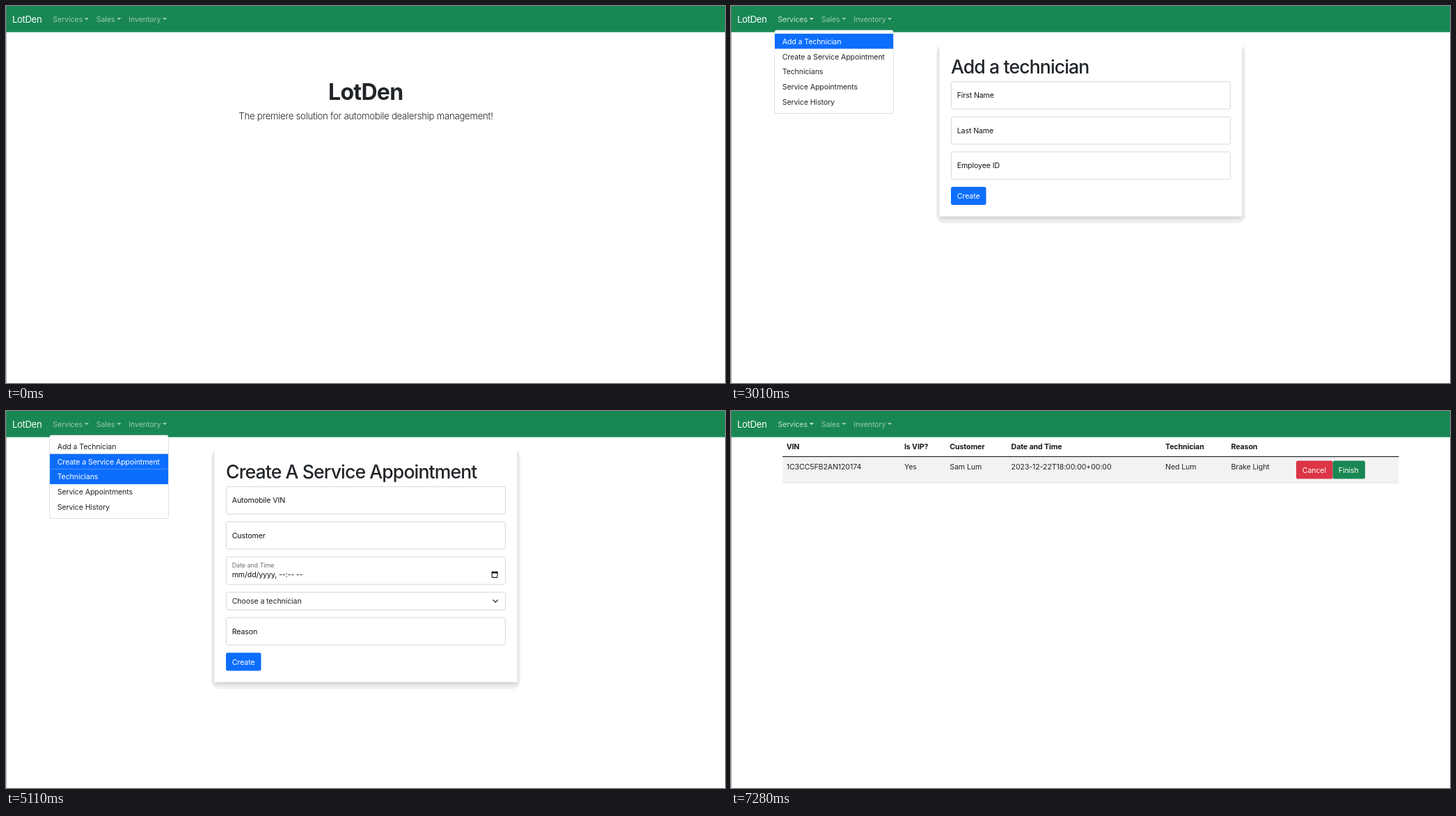
These frames come from a looping animation (1033x542 px, 8 s). An HTML page:

```html
<!DOCTYPE html>
<html lang="en">
<head>
<meta charset="utf-8">
<title>Dealership management</title>
<style>
  html, body { margin: 0; width: 100%; height: 100%; overflow: hidden; background: #fff; }
  svg { display: block; width: 100vw; height: 100vh; }
  text { font: 400 10.6px Inter, "Noto Sans", sans-serif; letter-spacing: -.01em; font-optical-sizing: none; white-space: pre; }
  .brand { font-size: 13.2px; letter-spacing: -.03em; }
  .hero { font-size: 32px; font-weight: 700; letter-spacing: -.022em; }
  .lead { font-size: 13.2px; font-weight: 300; letter-spacing: -.02em; }
  .title { font-size: 26.6px; font-weight: 500; letter-spacing: -.033em; }
  .small { font-size: 9px; }
  .head { font-weight: 700; }
  .mid { text-anchor: middle; }
  .card { filter: drop-shadow(0 3px 2.5px rgba(0, 0, 0, .14)); }
</style>
</head>
<body>
<svg id="stage" viewBox="0 0 1033 542" preserveAspectRatio="none"></svg>
<script>
const LOOP = 8000, TICK = 70;
const INK = '#212529', BLUE = '#0d6efd', GREEN = '#198754', RED = '#dc3545';
const BRAND = 'LotDen';
const ITEMS = ['Add a Technician', 'Create a Service Appointment', 'Technicians',
  'Service Appointments', 'Service History'];
const ITEM_H = 21.9;

// Pages by start time; "active" is the menu entry of that page.
const PAGES = [
  { at: 0, draw: home, active: -1 },
  { at: 2310, draw: technicianForm, active: 0 },
  { at: 3780, draw: appointmentForm, active: 1 },
  { at: 5180, draw: technicianList, active: 2 },
  { at: 6650, draw: appointmentList, active: 3 }
];

// Each visit to the menu: open, hover an item, press it, close.
const MENUS = [
  { open: 630, hover: 1540, press: 2240, close: 2310, item: 0 },
  { open: 2870, hover: 3290, press: 3640, close: 3780, item: 1 },
  { open: 4480, hover: 4830, press: 5110, close: 5180, item: 2 },
  { open: 6020, hover: 6300, press: 6580, close: 6650, item: 3 }
];

// Fades of the "Services" link: start, end, target (1 = lit).
const FADES = [
  [210, 350, 1], [980, 1190, 0], [2450, 2660, 1], [3080, 3290, 0], [4200, 4410, 1],
  [4550, 4690, 0], [5600, 5810, 1], [6090, 6300, 0], [7070, 7280, 1]
];

const rect = (x, y, w, h, fill, more = '') =>
  `<rect x="${x}" y="${y}" width="${w}" height="${h}" fill="${fill}" ${more}/>`;
const text = (x, y, str, fill = INK, cls = '') =>
  `<text x="${x}" y="${y}" fill="${fill}" class="${cls}">${str}</text>`;
const path = (d, more) => `<path d="${d}" ${more}/>`;

function button(x, y, w, label, fill, pad = 8.8) {
  return rect(x, y, w, 26, fill, 'rx="2.7"') + text(x + pad, y + 17, label, '#fff');
}

function box(y, h = 39.4) {
  return rect(316.4, y, 401, h, '#fff', 'rx="2.7" stroke="#ced4da" stroke-width=".9"');
}

function field(y, label) {
  return box(y) + text(324.7, y + 23.5, label, '#111');
}

function card(bottom, title) {
  return rect(295, 56, 444, bottom + 10 - 56, '#f1f1f1', 'rx="12"') +
    rect(299.5, 54, 434.8, bottom - 54, '#fff', 'class="card"') +
    rect(290, 44, 454, 12.5, '#fff') +
    text(316, 97, title, INK, 'title');
}

function home() {
  return text(516.7, 135.3, BRAND, INK, 'hero mid') +
    text(517, 163, 'The premiere solution for automobile dealership management!', INK, 'lead mid');
}

function technicianForm() {
  return card(302.5, 'Add a technician') +
    ['First Name', 'Last Name', 'Employee ID'].map((s, i) => field(108.8 + i * 50.5, s)).join('') +
    button(316, 260, 50.5, 'Create', BLUE);
}

function appointmentForm() {
  const line = `fill="none" stroke="${INK}" stroke-width="1.2"`;
  return card(389.8, 'Create A Service Appointment') +
    field(108.8, 'Automobile VIN') + field(159.3, 'Customer') +
    box(209.8) + text(324.7, 225.3, 'Date and Time', '#6b6e72', 'small') +
    text(324.7, 239.2, 'mm/dd/yyyy, --:-- --', '#111') +
    rect(698.2, 231.6, 7.8, 7.8, 'none', 'rx=".8" stroke="#111" stroke-width="1.1"') +
    rect(697.7, 231, 8.8, 2.4, '#111') +
    path('M699.9 230v2M704.3 230v2', line) +
    box(260.6, 25.4) + text(324.7, 277, 'Choose a technician') +
    path('M699.8 271.6l3.4 3.4 3.4-3.4', line + ' stroke-linecap="round" stroke-linejoin="round"') +
    field(297.1, 'Reason') +
    button(316, 347.5, 50.5, 'Create', BLUE);
}

function table(cols, heads, cells, bottom) {
  const row = (list, y, cls) => list.map((s, i) => text(cols[i], y, s, cls ? '#16191c' : INK, cls)).join('');
  let out = row(heads, 55, 'head') + rect(74, 65, 885.5, 1.4, INK);
  if (cells) {
    out += rect(74, 66.4, 885.5, bottom - 66.4, '#f2f2f2') +
      rect(74, bottom - .7, 885.5, .8, '#dee2e6') + row(cells, 84, '');
  }
  return out;
}

function technicianList() {
  return table([79.7, 365, 645.5], ['First Name', 'Last Name', 'Employee ID'],
    ['Ned', 'Lum', '1'], 94.6);
}

function appointmentList(t) {
  const loaded = t >= 6720;
  return table([79.7, 249, 314.3, 402.6, 624, 718.5],
    ['VIN', 'Is VIP?', 'Customer', 'Date and Time', 'Technician', 'Reason'],
    loaded && ['1C3CC5FB2AN120174', 'Yes', 'Sam Lum', '2023-12-22T18:00:00+00:00', 'Ned Lum', 'Brake Light'],
    103.6) +
    (loaded ? button(812, 71.6, 52.5, 'Cancel', RED) + button(864.5, 71.6, 46.5, 'Finish', GREEN, 8.3) : '');
}

function glow(t) {
  let v = 0;
  for (const [a, b, to] of FADES) {
    const k = Math.min(1, Math.max(0, (t - a) / (b - a)));
    v += (to - v) * k;
  }
  return v;
}

function link(x, caret, label, alpha) {
  const fill = `rgba(255,255,255,${alpha})`;
  return text(x, 22.6, label, fill) + path(`M${caret} 17h6.4l-3.2 3.2z`, `fill="${fill}"`);
}

function navbar(t) {
  return rect(0, 0, 1033, 37.6, GREEN) +
    text(9, 23.6, BRAND, '#fff', 'brand') +
    link(67.3, 112.6, 'Services', .55 + .2 * glow(t)) +
    link(129.7, 159.2, 'Sales', .55) +
    link(176.3, 224.8, 'Inventory', .55);
}

function menu(t, active) {
  const m = MENUS.find(v => t >= v.open && t < v.close);
  if (!m) return '';
  return rect(62.6, 34.5, 170.8, 120, '#fff', 'rx="2.7" stroke="#000" stroke-opacity=".17" stroke-width=".8"') +
    ITEMS.map((label, i) => {
      const mine = i === m.item;
      const lit = i === active || (mine && t >= m.press);
      const over = mine && t >= m.hover;
      const fill = lit ? BLUE : over ? '#e9ecef' : '#fff';
      const y = 39.8 + i * ITEM_H;
      return rect(63, y, 170, ITEM_H, fill) + text(73.7, y + 14.8, label, lit ? '#fff' : INK);
    }).join('');
}

const stage = document.getElementById('stage');
let last = -1;

function render(t) {
  const page = PAGES.filter(p => t >= p.at).pop();
  stage.innerHTML = rect(0, 0, 1033, 542, '#fff') + page.draw(t) + navbar(t) +
    rect(0, 0, .9, 542, '#777', 'fill-opacity=".6"') + menu(t, page.active);
}

function frame() {
  const t = Math.floor(performance.now() % LOOP / TICK) * TICK;
  if (t !== last) render(last = t);
  requestAnimationFrame(frame);
}
frame();
</script>
</body>
</html>
```
